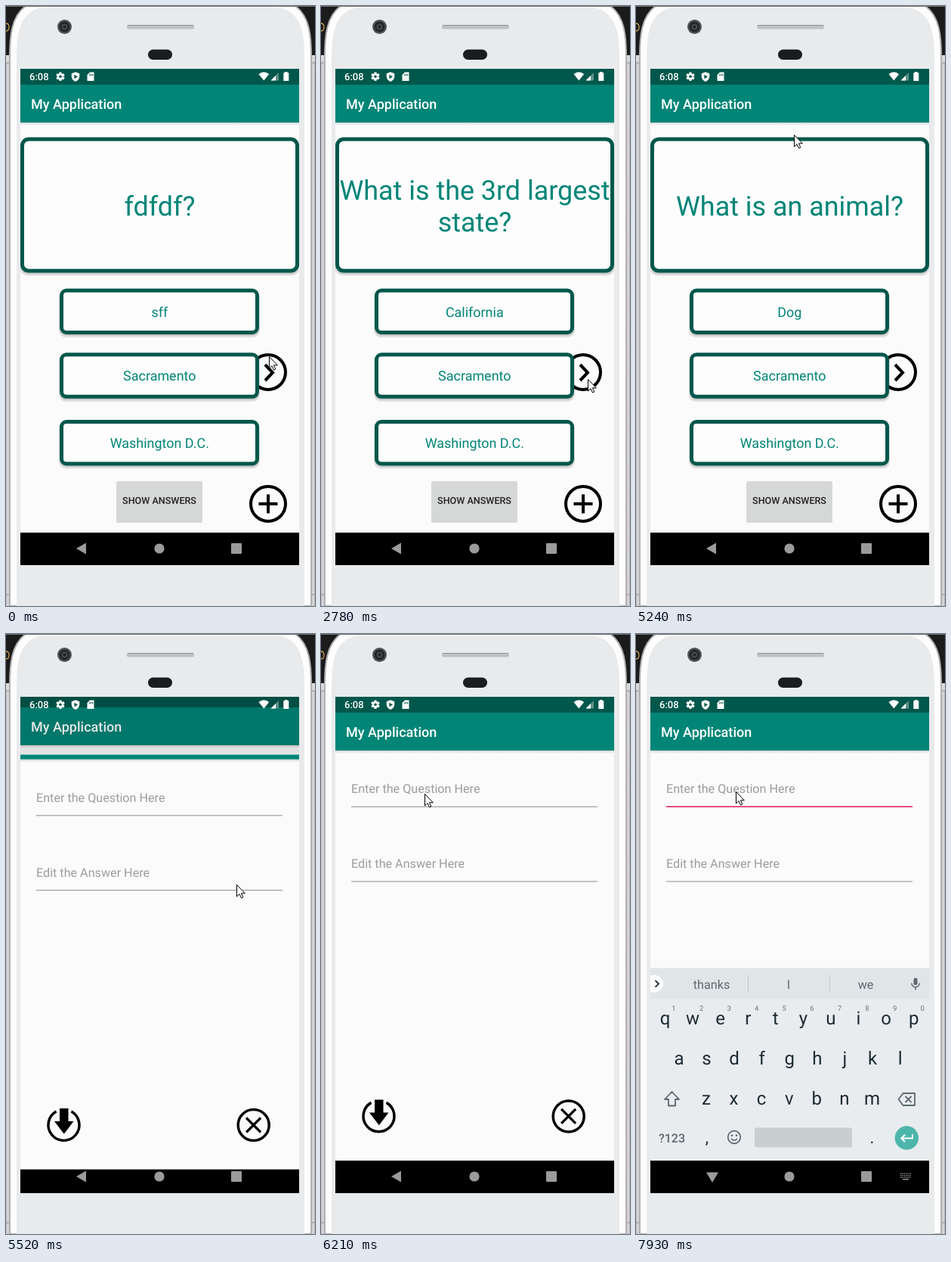
These frames come from a looping animation (409 by 793 pixels, 8 s). An HTML page:

```html
<!DOCTYPE html>
<html lang="en">
<head>
<meta charset="utf-8">
<title>Flashcard app</title>
<style>
  html, body { margin: 0; width: 100%; height: 100%; overflow: hidden; background: #1b1b1c; }
  svg { display: block; width: 100%; height: 100%; }
  text { font-family: Roboto, "Open Sans", sans-serif; text-rendering: geometricPrecision; }
</style>
</head>
<body>
<svg id="stage" viewBox="0 0 409 793"></svg>
<script>
const LOOP = 8000;
const TEAL = '#008577', DARK = '#00574b', PAPER = '#fbfbfb';

const rect = (x, y, w, h, fill, more = '') =>
  `<rect x="${x}" y="${y}" width="${w}" height="${h}" fill="${fill}" ${more}/>`;
const circle = (x, y, r, fill, more = '') =>
  `<circle cx="${x}" cy="${y}" r="${r}" fill="${fill}" ${more}/>`;
const path = (d, fill, more = '') => `<path d="${d}" fill="${fill}" ${more}/>`;
const line = (d, color, width, more = '') =>
  path(d, 'none', `stroke="${color}" stroke-width="${width}" ${more}`);
const text = (x, y, size, fill, str, more = '') =>
  `<text x="${x}" y="${y}" font-size="${size}" fill="${fill}" ${more}>${str}</text>`;
const MID = 'text-anchor="middle"', MEDIUM = 'font-weight="500"';

function phone() {
  const body = 'M5 793V68C5 40 7 14 26 0H383C402 14 404 40 404 68V793Z';
  return rect(0, 0, 409, 793, '#1b1b1c') +
    line('M0 23Q4 23 4 28T0 33', '#c3a04a', 1.3) +
    rect(0, 66, 409, 727, 'url(#edge)') +
    rect(0, 65, 6, 10, '#d9d9da') + rect(403, 65, 6, 10, '#d9d9da') +
    line('M0 75H6M403 75H409M0 778H6M403 778H409', '#8d8b8e', 1) +
    path(body, '#fdfdfd', 'stroke="#b3b1b4" stroke-width="2"') +
    path('M14 793V72C14 42 16 18 36 6Q44 2 54 2H355Q365 2 373 6C393 18 395 42 395 72V793Z', '#e8eaec') +
    line('M0 .5H409', '#6d6d70', 1) +
    circle(77.5, 27.5, 9.5, '#4f5153') + circle(77.5, 27.5, 7, '#232527') +
    circle(77.5, 27.5, 4, '#45484b') + circle(77.5, 27.5, 1.8, '#1c1e20') +
    rect(160, 25, 89, 5.5, '#bfc2c4', 'rx="2"') + line('M161 25.5H248', '#8f9294', 1) +
    rect(188, 57.5, 32, 13.5, '#1b1c20', 'rx="6.7"');
}

// Bars painted by each app window; they move with it.
function appWindow(content) {
  return rect(19, 83, 369, 656, PAPER) + content +
    rect(19, 154, 369, 4, 'url(#shade)') +
    rect(19, 83, 369, 21, DARK) + rect(19, 104, 369, 50, TEAL) +
    text(33, 136, 18.05, '#fff', 'My Application', MEDIUM) +
    rect(19, 696, 369, 43, '#000');
}

function card(x, y, w, h, r) {
  return rect(x - 1, y + 2, w + 2, h + 2, '#000', `rx="${r}" opacity=".1"`) +
    rect(x, y + 1, w, h + 1, '#000', `rx="${r}" opacity=".12"`) +
    rect(x + 2.5, y + 2.5, w - 5, h - 5, '#fdfdfd', `rx="${r - 2.5}" stroke="${DARK}" stroke-width="5"`);
}

function quizScreen() {
  const answer = (y, str, id) =>
    card(71, y, 264, 60.5, 9) + text(203.3, y + 37, 17.95, TEAL, str, `${MID} ${id}`);
  const ring = y => circle(347, y, 23, 'none', 'stroke="#000" stroke-width="4"');
  return ring(484) + line('M343 474L353 484.5L343 495', '#000', 4) +
    ring(658) + line('M334.5 658H359.5M347 645.5V670.5', '#000', 4) +
    card(19, 173.5, 369, 179, 11) +
    `<g id="question" font-size="35.9" fill="${TEAL}" ${MID}></g>` +
    answer(373.5, '', 'id="first"') + answer(458.3, 'Sacramento', '') + answer(547, 'Washington D.C.', '') +
    rect(146, 629, 114, 54, '#000', 'rx="2" opacity=".15"') +
    rect(146.5, 628, 113, 53.5, '#d6d7d7', 'rx="2"') +
    text(203, 658.3, 12.57, '#212121', 'SHOW ANSWERS', `${MID} ${MEDIUM}`);
}

function formScreen() {
  return text(40, 210, 16.16, '#9c9c9c', 'Enter the Question Here') +
    text(40, 309, 16.16, '#9c9c9c', 'Edit the Answer Here') +
    '<path id="underline" d="M40 228.3H366"/>' + line('M40 327.1H366', '#a2a2a2', 1.3) +
    rect(40, 192, 1.8, 22, '#d81b60', 'id="caret"') +
    line('M66.5 619.4A20.5 20.5 0 1 0 86.5 619.4', '#000', 3.5) +
    path('M71 615.4H82.5V632.4H89.5L76.8 649.2L64 632.4H71Z', '#000') +
    circle(327.7, 637.4, 20.5, 'none', 'stroke="#000" stroke-width="3.5"') +
    line('M318.1 627.9L337.1 646.9M337.1 627.9L318.1 646.9', '#000', 3.2);
}

function keyboard() {
  const INK = '#1d2a30', SOFT = '#5c686e', PITCH = 36.57;
  const row = (keys, x, y) => [...keys].map((k, i) => text(x + i * PITCH, y, 24, INK, k, MID)).join('');
  const hints = [...'1234567890'].map((k, i) => text(50 + i * PITCH, 498, 9.5, '#6a767d', k, MID)).join('');
  return rect(19, 441, 369, 255, '#e8ecef') + rect(19, 442, 369, 39.5, '#e0e5e8') +
    path('M19 451H26A11.3 11.3 0 0 1 26 473.5H19Z', '#fff') +
    line('M25.5 458L30 462.3L25.5 466.6', '#20282c', 1.8) +
    line('M148.5 451V473M256.5 451V473', '#c0c7cb', 1) +
    text(100, 468.5, 16.2, SOFT, 'thanks', MID) + text(202, 468.5, 16.2, SOFT, 'I', MID) +
    text(304, 468.5, 16.2, SOFT, 'we', MID) +
    rect(367.5, 454.5, 5, 9.5, SOFT, 'rx="2.5"') +
    line('M364.8 461.5A5.2 5.2 0 0 0 375.2 461.5M370 467V470.5', SOFT, 1.5) +
    row('qwertyuiop', 38.5, 516) + hints + row('asdfghjkl', 57, 569) + row('zxcvbnm', 93, 622) +
    line('M47.5 605L57 615H52V623.5H43V615H38Z', SOFT, 1.8, 'stroke-linejoin="round"') +
    line('M347.5 615L353.5 607H369V623H353.5Z', SOFT, 1.8, 'stroke-linejoin="round"') +
    line('M356.5 611L364.5 619M364.5 611L356.5 619', SOFT, 1.8) +
    text(47.5, 671.5, 16, SOFT, '?123', `${MID} ${MEDIUM}`) +
    text(94, 673, 22, INK, ',', MID) + text(312.5, 673, 22, INK, '.', MID) +
    circle(130, 665, 8.3, 'none', `stroke="${SOFT}" stroke-width="1.7"`) +
    circle(127, 662.7, 1.3, SOFT) + circle(133, 662.7, 1.3, SOFT) +
    line('M126 667Q130 671.5 134 667', SOFT, 1.5) +
    rect(157, 652.5, 129, 26, '#c9ced1', 'rx="3"') +
    circle(358.3, 666, 15.7, '#4db6ac') +
    line('M366 661V666.5H351.5M356 661.8L351.3 666.5L356 671.2', '#fff', 2);
}

function statusIcons() {
  const teeth = [0, 60, 120].map(a =>
    rect(70.4, 87.5, 3.2, 11.4, '#fff', `transform="rotate(${a} 72 93.2)"`)).join('');
  return text(31, 98, 13, '#fff', '6:08', MEDIUM) +
    teeth + circle(72, 93.2, 4.2, '#fff') + circle(72, 93.2, 1.8, DARK) +
    path('M92 87.2L97.3 89.2V93Q97 97.8 92 100Q87 97.8 86.7 93V89.2Z', '#fff') +
    path('M90.4 90.8L95 93.5L90.4 96.2Z', DARK) +
    path('M111 87.5H116.5V99H107.5V91Z', '#fff') +
    line('M110.7 89.8V92.3M112.7 89.8V92.3M114.7 89.8V92.3', DARK, 1) +
    path('M334.5 90Q341.3 84.7 348.2 90L341.3 98.5Z', '#fff') +
    path('M361 88V98.5H350.5Z', '#5f928a') + path('M357 92V98.5H350.5Z', '#fff') +
    path('M369 87H372.5V88.3H374.3V99H367.3V88.3H369Z', '#fff');
}

function navIcons() {
  const G = '#9b9b9b';
  let keys = '';
  for (let r = 0; r < 3; r++)
    for (let c = 0; c < 6; c++) keys += rect(350 + c * 2.4, 712.5 + r * 2.5, 1.3, 1.4, G);
  return path('M93 717L106 709.5V724.5Z', G, 'id="back"') +
    circle(203, 717, 6.6, G) + rect(298, 710, 14, 14, G, 'rx="1"') +
    `<g id="switch">${keys}${rect(353, 720, 8, 1.4, G)}</g>`;
}

document.getElementById('stage').innerHTML = `<defs>
  <linearGradient id="edge"><stop offset="0" stop-color="#b5b3b6"/><stop offset=".006" stop-color="#dedddf"/>
    <stop offset=".013" stop-color="#a9a7aa"/><stop offset=".987" stop-color="#a9a7aa"/>
    <stop offset=".994" stop-color="#dedddf"/><stop offset="1" stop-color="#b5b3b6"/></linearGradient>
  <linearGradient id="shade" x2="0" y2="1"><stop stop-opacity=".15"/><stop offset="1" stop-opacity="0"/></linearGradient>
  <clipPath id="screen"><rect x="19" y="83" width="369" height="656"/></clipPath>
  <clipPath id="reveal"><rect id="revealBox" x="19" y="83" width="369" height="656"/></clipPath></defs>
  ${phone()}
  <g clip-path="url(#screen)">
    <g id="quiz">${appWindow(quizScreen())}${rect(19, 83, 369, 656, '#000', 'id="dim" opacity="0"')}</g>
    <g id="formClip" clip-path="url(#reveal)"><g id="form">${appWindow(formScreen())}</g></g>
    <g id="keys">${keyboard()}</g>
    ${statusIcons()}${navIcons()}
  </g>
  <path id="pointer" d="M.5 .5V16L4 12.7L6.5 18L8.8 17L6.4 11.8H11.3Z" fill="#fff" stroke="#000" stroke-width="1"/>`;

const el = {};
for (const node of document.querySelectorAll('[id]')) el[node.id] = node;

// Pointer track: time, x, y.
const track = [
  [0, 348, 463], [560, 348, 475], [710, 350, 475], [1960, 342, 454], [2080, 347, 476], [2200, 351, 502],
  [2350, 353, 502], [2780, 353, 493], [3580, 357, 436], [3700, 354, 443], [3850, 347, 570],
  [3970, 330, 690], [4090, 309, 749], [4210, 284, 738], [4330, 267, 714], [4480, 316, 584],
  [4600, 334, 617], [4750, 326, 646], [4870, 332, 657], [4990, 336, 660], [5240, 209, 170],
  [5520, 305, 331], [5640, 292, 337], [5790, 274, 341], [5940, 212, 268], [6090, 165, 228],
  [6210, 137, 211], [6360, 134, 209], [6480, 132, 208]
];
const quiz = [
  [0, ['fdfdf?'], 'sff'],
  [2500, ['What is the 3rd largest', 'state?'], 'California'],
  [3180, ['What is an animal?'], 'Dog']
];
const at = (steps, t) => steps.findLast(s => s[0] <= t);
const show = (node, on) => node.setAttribute('display', on ? 'inline' : 'none');
const move = (node, x, y) => node.setAttribute('transform', `translate(${x} ${y})`);
let shown;

function draw(t) {
  const [, x, y] = at(track, t);
  move(el.pointer, x, y);

  const item = at(quiz, t);
  if (item !== shown) {
    shown = item;
    const top = item[1].length > 1 ? 256 : 277;
    el.question.innerHTML = item[1].map((s, i) => `<text x="203.5" y="${top + i * 42}">${s}</text>`).join('');
    el.first.textContent = item[2];
  }

  // The form slides up and is uncovered while the quiz dims and drifts away.
  const opening = t >= 5520, early = t < 5640;
  const slide = early ? 11.6 : t < 5790 ? 2 : 0;
  const top = early ? 159.6 : 83;
  show(el.formClip, opening);
  move(el.form, 0, slide);
  move(el.quiz, 0, opening ? -7 : 0);
  el.dim.setAttribute('opacity', opening ? .1 : 0);
  el.revealBox.setAttribute('y', top);
  el.revealBox.setAttribute('height', 739 - top);

  const focus = t >= 6600;
  el.underline.setAttribute('stroke', focus ? '#d81b60' : '#a2a2a2');
  el.underline.setAttribute('stroke-width', focus ? 1.6 : 1.3);
  show(el.caret, (focus && t < 7280) || (t >= 7530 && t < 7930));

  const typing = t >= 7280;
  el.back.setAttribute('d', typing ? 'M93 711.5H109L101 725Z' : 'M93 717L106 709.5V724.5Z');
  show(el.switch, typing);
  show(el.keys, t >= 7530);
  move(el.keys, 0, t < 7680 ? 7 : 0);
  el.keys.setAttribute('opacity', t < 7680 ? .9 : 1);
}

const start = performance.now();
function tick() {
  draw((performance.now() - start) % LOOP);
  requestAnimationFrame(tick);
}
tick();
</script>
</body>
</html>
```
